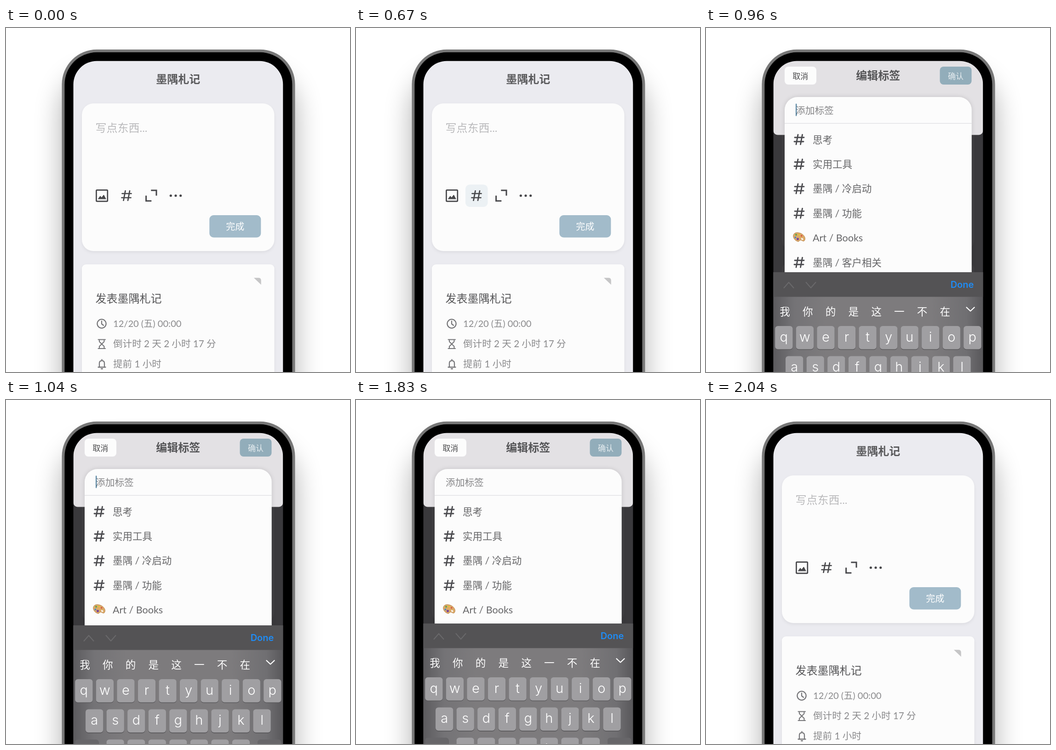
Recreate the animation shown at these times as an HTML page. Size 748 by 748 pixels, loop 2.54 s.

```html
<!DOCTYPE html>
<html lang="zh-CN">
<head>
<meta charset="utf-8">
<title>Note app tags</title>
<style>
html, body { margin: 0; width: 100%; height: 100%; overflow: hidden; background: #fff; }
#stage { position: relative; width: 748px; height: 748px; overflow: hidden; }
#shade { position: absolute; left: 123px; top: 49px; width: 504px; height: 900px; border-radius: 76px;
  box-shadow: 0 54px 60px rgba(0,0,0,.33); }
svg { position: absolute; left: 0; top: 0; }
text { font-family: Lato, "Noto Sans CJK SC", "Noto Sans CJK", sans-serif; }
.sf { font-family: Inter, Roboto, sans-serif; }
.line { fill: none; stroke-linecap: round; stroke-linejoin: round; }
.soft { filter: drop-shadow(0 3px 3px rgba(0,0,0,.06)); }
.lift { filter: drop-shadow(0 0 5px rgba(0,0,0,.13)); }
</style>
</head>
<body>
<div id="stage">
<div id="shade"></div>
<svg width="748" height="748" viewBox="0 0 748 748">
  <defs>
    <clipPath id="screen"><rect x="146.5" y="71.7" width="455.8" height="800" rx="51"/></clipPath>
    <linearGradient id="edge">
      <stop offset="0" stop-color="#5c5b5e"/><stop offset=".1" stop-color="#747376"/>
      <stop offset=".25" stop-color="#7d7b7d"/><stop offset=".75" stop-color="#7d7b7d"/>
      <stop offset=".92" stop-color="#706f72"/><stop offset="1" stop-color="#58575a"/>
    </linearGradient>
    <path id="hash" class="line" d="M9.5 1.5 5.5 22.5M19 1.5 15 22.5M2.5 7.5H22.5M1.5 16.5H21.5"/>
    <g id="palette" transform="rotate(28)">
      <path d="M-13.5 0C-13.5-7-5-9.5 1-9.5 8-9.5 14.5-5 13.5 1 12.5 5 7 2 5 4 3 7 5 9.5-1 9.5-8 9.5-13.5 5-13.5 0Z" fill="#dcaa68" stroke="#b27c45" stroke-width=".8"/>
      <ellipse cx="7.5" cy="0" rx="2.4" ry="1.7" fill="#fcfcfc"/>
      <circle cx="-8.5" cy="-2" r="2" fill="#5fa342"/><circle cx="-3" cy="-5.5" r="1.9" fill="#e8bd35"/>
      <circle cx="3" cy="-5.5" r="1.8" fill="#d5543f"/><circle cx="-7" cy="4" r="1.9" fill="#4a86c4"/>
      <circle cx="-1" cy="4.5" r="2.5" fill="#76449d"/>
    </g>
  </defs>
  <rect x="121.5" y="46.7" width="507" height="900" rx="76" fill="#777"/>
  <rect x="127.4" y="52.8" width="495" height="900" rx="70" fill="#000"/>
  <g clip-path="url(#screen)">
    <g id="home">
      <rect x="146" y="71" width="457" height="677" fill="#ebebf0"/>
      <rect class="soft" x="165" y="164" width="418.5" height="321" rx="25" fill="#fcfcfc"/>
      <rect class="soft" x="165" y="514" width="418.5" height="300" rx="9" fill="#fcfcfc"/>
      <rect id="press" x="238" y="340.5" width="48.5" height="48.5" rx="9" fill="#ecf1f4"/>
      <g class="line" stroke="#47474a" stroke-width="2.7">
        <rect x="196.4" y="352.4" width="24.4" height="24.4" rx="1.5"/>
        <path d="M200.5 371.5 205 365.5 208 369 212.5 363 217 371.5Z" fill="#47474a" stroke-width="1"/>
        <use href="#hash" x="250" y="352.5"/>
        <path d="M304.6 364.5V376H316.3M315.3 353H327V364.5" stroke-width="3" stroke-linecap="butt" stroke-linejoin="miter"/>
      </g>
      <g fill="#47474a"><circle cx="358.3" cy="364.5" r="2.6"/><circle cx="369" cy="364.5" r="2.6"/><circle cx="379.7" cy="364.5" r="2.6"/></g>
      <rect x="442.3" y="407" width="112" height="48.5" rx="9" fill="#a2bbca"/>
      <path d="M539 543.3H549Q554.7 543.3 554.7 549V558.3Z" fill="#c5c5c6"/>
      <g class="line" stroke="#77777a" stroke-width="2.3">
        <circle cx="208" cy="643" r="9.6"/><path d="M208 637.5V643.5L212 646.5"/>
        <path d="M200.5 677.5H216M200.5 697H216M203 678V682L208.2 687.2 213.4 682V678M203 696.5V692.3L208.2 687.2 213.4 692.3V696.5" stroke-width="2.1"/>
        <path d="M200.5 737.5H216.5M203 737V729Q203 723.3 208.5 723.3T214 729V737M208.5 721V723M207 741H210"/>
      </g>
    </g>
    <g id="edit">
      <rect x="146" y="71" width="457" height="677" fill="#3a393c"/>
      <rect x="165" y="164" width="418.5" height="321" rx="25" fill="#3f3e41"/>
      <rect x="165" y="514" width="418.5" height="300" rx="9" fill="#3f3e41"/>
      <rect x="146.5" y="60" width="455.8" height="172.5" rx="9" fill="#e3e1e4"/>
      <rect x="171" y="84" width="69" height="39" rx="8" fill="#fcfcfc"/>
      <rect x="508.5" y="84" width="69" height="39" rx="8" fill="#92adba"/>
      <rect class="lift" x="171" y="150" width="406.7" height="700" rx="28" fill="#fcfcfc"/>
      <rect x="171" y="206.8" width="406.7" height="1.2" fill="#dddde0"/>
    </g>
    <g id="keys">
      <rect x="146" width="457" height="420" fill="url(#edge)"/>
      <rect x="146" width="457" height="53.5" fill="#545355"/>
      <path class="line" d="M169.5 34 180 22 190.5 34M217.5 22 228 34 238.5 22" stroke="#6a696b" stroke-width="2"/>
      <g id="words">
        <path class="line" d="M566.5 76.5 575 84.5 583.5 76.5" stroke="#fff" stroke-width="2.4"/>
      </g>
    </g>
  </g>
</svg>
</div>
<script>
const $ = id => document.getElementById(id);
const home = $("home"), edit = $("edit"), keys = $("keys"), words = $("words");

function add(parent, tag, attrs, content) {
  const el = document.createElementNS("http://www.w3.org/2000/svg", tag);
  for (const k in attrs) el.setAttribute(k, attrs[k]);
  if (content) el.textContent = content;
  parent.appendChild(el);
  return el;
}
const label = (parent, str, x, y, size, fill, more) =>
  add(parent, "text", { x, y, "font-size": size, fill, ...more }, str);
const mid = { "text-anchor": "middle" };
const bold = { ...mid, "font-weight": 700 };

// Main page
label(home, "墨隅札记", 374.3, 119.5, 24, "#5a5a5c", bold);
label(home, "写点东西...", 194.5, 226, 24, "#bababc");
label(home, "完成", 498.2, 439, 20, "#fff", mid);
label(home, "发表墨隅札记", 194.5, 597, 24, "#555557");
label(home, "12/20 (五) 00:00", 233, 650, 20.1, "#8a8a8c");
label(home, "倒计时 2 天 2 小时 17 分", 233, 694, 20.6, "#8a8a8c");
label(home, "提前 1 小时", 233, 738, 20.6, "#8a8a8c");

// Tag editor
label(edit, "取消", 205.3, 110.5, 17, "#48484a", mid);
label(edit, "编辑标签", 374.3, 111.5, 24, "#555557", bold);
label(edit, "确认", 543, 110.5, 17, "#e6edf0", mid);
label(edit, "添加标签", 195, 186.5, 20.7, "#858587");
const tags = ["思考", "实用工具", "墨隅 / 冷启动", "墨隅 / 功能", "Art / Books", "墨隅 / 客户相关", "墨隅 / 文案", "Art / Movies"];
tags.forEach((tag, i) => {
  const y = 242.5 + i * 53.45;
  if (tag.startsWith("Art")) add(edit, "use", { href: "#palette", x: 202.5, y: y - 1 });
  else add(edit, "use", { href: "#hash", x: 190.5, y: y - 12, stroke: "#4c4c50", "stroke-width": 2.9 });
  label(edit, tag, 232, y + 8, 21.5, "#666668");
});
const caret = add(edit, "rect", { x: 195, y: 164.5, width: 2.2, height: 27, rx: 1, fill: "#5583a0" });

// Keyboard, laid out from its top edge
label(keys, "Done", 557, 34, 20, "#1f8cf5", { ...mid, class: "sf", "font-weight": 600 });
[..."我你的是这一不在"].forEach((c, i) =>
  label(words, c, 171.5 + i * 49.75, 94, 22.5, "#fff", mid));
function keycap(x, y, w, fill, letter) {
  add(keys, "rect", { x, y: y + 1.3, width: w, height: 50.5, rx: 6, fill: "#555457" });
  add(keys, "rect", { x, y, width: w, height: 50.5, rx: 6, fill });
  if (letter) label(keys, letter, x + w / 2, y + 33.5, 29, "#fff", { ...mid, class: "sf", "font-weight": 300 });
}
[["qwertyuiop", 150.2], ["asdfghjkl", 173], ["zxcvbnm", 218.5]].forEach(([row, x0], r) =>
  [...row].forEach((c, i) => keycap(x0 + i * 45.55, 117 + r * 65.6, 38.3, "#a09fa2", c)));
keycap(150.2, 248.2, 51.5, "#676669");
keycap(547, 248.2, 51.5, "#676669");

const LOOP = 2540, OPEN = 920, CLOSE = 1960, BACK = 2040, TRAVEL = 410, REST = 486;
const spring = ms => { const x = 0.0366 * ms; return (1 + x) * Math.exp(-x); };
const ramp = (t, a, b) => Math.min(1, Math.max(0, (t - a) / (b - a)));

function draw(t) {
  const open = t >= OPEN && t < BACK;
  home.style.display = open ? "none" : "";
  edit.style.display = keys.style.display = open ? "" : "none";
  $("press").style.display = t >= 670 && t < 710 ? "" : "none";
  if (!open) return;
  const step = Math.floor(t / 40) * 40;
  const closing = step >= CLOSE;
  const drop = closing ? 1 - spring(step - CLOSE + 9.3) : spring(step - OPEN + 62.8);
  keys.setAttribute("transform", `translate(0 ${Math.round(REST + TRAVEL * drop)})`);
  words.style.display = closing ? "none" : "";
  // Caret blinks every 500 ms
  const p = (t - 670) % 500;
  caret.style.opacity = closing ? 0 : t < 1170 ? 1 : 1 - ramp(p, 0, 80) + ramp(p, 170, 250);
}
function tick(now) {
  draw(now % LOOP);
  requestAnimationFrame(tick);
}
draw(0);
requestAnimationFrame(tick);
</script>
</body>
</html>
```
